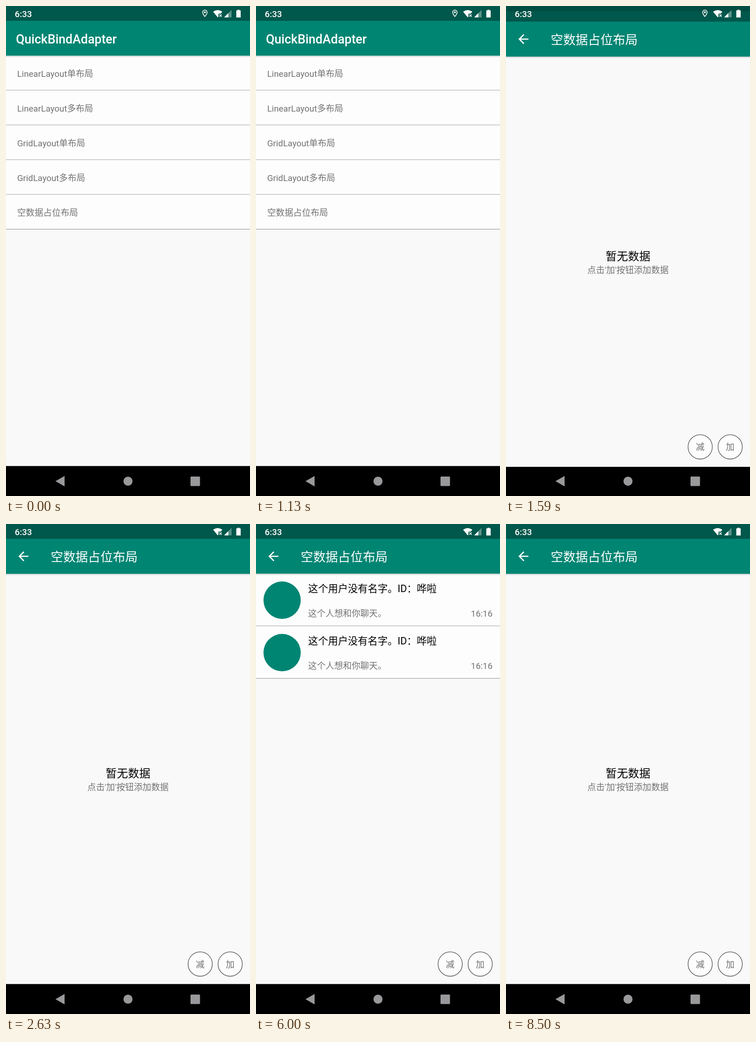
Recreate the animation shown at these times as an HTML page. Size 529x1058 px, loop 8.54 s.

```html
<!DOCTYPE html>
<html lang="zh-CN">
<head>
<meta charset="utf-8">
<title>QuickBindAdapter</title>
<style>
  html, body { margin: 0; width: 100%; height: 100%; overflow: hidden; background: #000; }
  svg { display: block; width: 100%; height: 100%; }
  text { font: 400 18.86px Roboto, "Noto Sans CJK SC", "Noto Sans CJK", sans-serif; fill: #737373; }
  .title { font-size: 26.94px; fill: #fff; }
  .medium { font-weight: 500; }
  .clock { font-weight: 500; fill: #fff; }
  .name { font-size: 21.55px; fill: #000; }
  .big { font-size: 24.25px; fill: #000; }
  .mid { text-anchor: middle; }
  .end { text-anchor: end; }
  .line { fill: #a6a6a8; }
</style>
</head>
<body>
<svg viewBox="0 0 529 1058" preserveAspectRatio="none">
  <defs>
    <linearGradient id="shade" x1="0" y1="0" x2="0" y2="1">
      <stop offset="0" stop-color="#000" stop-opacity=".16"/>
      <stop offset="1" stop-color="#000" stop-opacity="0"/>
    </linearGradient>
    <clipPath id="reveal"><rect id="clip" width="529" height="1058"/></clipPath>
    <g id="frame">
      <rect width="529" height="1058" fill="#000"/>
      <rect y="32" width="529" height="961.3" fill="#f9f9fa"/>
      <rect width="529" height="32.3" fill="#00574b"/>
      <rect y="32" width="529" height="75.6" fill="#008573"/>
    </g>
  </defs>
  <rect width="529" height="1058" fill="#000"/>

  <g id="home">
    <use href="#frame"/>
    <text class="title medium" x="21.5" y="81">QuickBindAdapter</text>
    <g id="menu"></g>
    <rect y="107.6" width="529" height="4" fill="url(#shade)"/>
  </g>

  <g id="detail"><g clip-path="url(#reveal)">
    <use href="#frame"/>
    <path fill="#fff" transform="translate(21.6 53.6) scale(1.347)"
      d="M20 11H7.83l5.59-5.59L12 4l-8 8 8 8 1.41-1.41L7.83 13H20z"/>
    <text class="title" x="97" y="81">空数据占位布局</text>
    <g id="empty">
      <text class="big mid" x="264.5" y="547">暂无数据</text>
      <text class="mid" x="264.5" y="575">点击'加'按钮添加数据</text>
    </g>
    <g id="chats"></g>
    <rect y="107.6" width="529" height="4" fill="url(#shade)"/>
    <g id="buttons"></g>
  </g></g>

  <g id="status" fill="#fff">
    <text class="clock" x="19" y="23.6">6:33</text>
    <g id="pin" transform="translate(421.6 6.4) scale(.8)">
      <path d="M12 2C8.13 2 5 5.13 5 9c0 5.25 7 13 7 13s7-7.75 7-13c0-3.87-3.13-7-7-7zM7 9c0-2.76 2.24-5 5-5s5 2.24 5 5c0 2.88-2.88 7.19-5 9.88C9.92 16.21 7 11.85 7 9z"/>
      <circle cx="12" cy="9" r="2.5"/>
    </g>
    <path d="M449 12.3Q459 5.2 469 12.3L465.6 16.6H460.6V22.8L459 24.4Z"/>
    <path d="M462.6 18.2l5 5m0-5l-5 5" stroke="#fff" stroke-width="1.6"/>
    <path d="M489 8.6V24.4H473Z" opacity=".35"/>
    <path d="M482 15.5V24.4H473Z"/>
    <path d="M499.3 9.6H502V8H506.2V9.6H508.8V24.8H499.3Z"/>
  </g>
  <g id="nav" fill="#dadade" fill-opacity=".7">
    <path d="M107.3 1026L127 1014.8V1037.2Z"/>
    <circle cx="264.5" cy="1026" r="9.8"/>
    <rect x="400" y="1016" width="20.6" height="20.4" rx="1.6"/>
  </g>
</svg>
<script>
const LOOP = 8540, HEIGHT = 1058;
const OPEN = 1271, OPEN_MS = 425, DIM_MS = 117;
const PIN_OFF = 2100, FADE = 120;
const rows = [
  { on: 3200, off: 7700 },
  { on: 3770, off: 7000 }
];

const $ = id => document.getElementById(id);
const clamp = v => Math.min(1, Math.max(0, v));
const ramp = (t, start, ms) => clamp((t - start) / ms);

// Height of a cubic curve at x, where p = [x0, y0, ..., x3, y3].
function curve(p, x) {
  const at = (s, k) => {
    const r = 1 - s;
    return r * r * r * p[k] + 3 * r * r * s * p[k + 2] + 3 * r * s * s * p[k + 4] + s * s * s * p[k + 6];
  };
  let lo = 0, hi = 1;
  for (let i = 0; i < 30; i++) {
    const m = (lo + hi) / 2;
    if (at(m, 0) < x) lo = m; else hi = m;
  }
  return at(hi, 1);
}
const slide = x => x >= 1 ? 1 : curve([0, 0, .4, 0, .2, 1, 1, 1], x);
const unveil = x => x >= 1 ? 1 : x < 1 / 6
  ? curve([0, 0, .05, 0, .13333, .06, 1 / 6, .4], x)
  : curve([1 / 6, .4, .20833, .82, .25, 1, 1, 1], x);

$('menu').innerHTML = ['LinearLayout单布局', 'LinearLayout多布局', 'GridLayout单布局', 'GridLayout多布局', '空数据占位布局']
  .map((label, i) => `<g transform="translate(0 ${107.5 + 75 * i})">
    <rect width="529" height="75" fill="#fdfdfd"/>
    <text x="24.2" y="45.5">${label}</text>
    <rect class="line" y="73.8" width="529" height="1.35"/></g>`).join('');

$('chats').innerHTML = rows.map((row, i) => `<g transform="translate(0 ${107.5 + 113.2 * i})">
    <rect width="529" height="113.2" fill="#fdfdfd"/>
    <circle cx="56.6" cy="57" r="40.4" fill="#008573"/>
    <text class="name" x="113.1" y="39.5">这个用户没有名字。ID：哗啦</text>
    <text x="113.1" y="92.3">这个人想和你聊天。</text>
    <text class="end" x="512.8" y="92.3">16:16</text>
    <rect class="line" y="112" width="529" height="1.35"/></g>`).join('');

$('buttons').innerHTML = [[421, '减'], [486, '加']].map(([x, label]) =>
  `<circle cx="${x}" cy="950.2" r="26.3" fill="#fdfdfd" stroke="#555" stroke-width="1.35"/>
   <text class="mid" x="${x}" y="957.6">${label}</text>`).join('');

const cells = [...$('chats').children];
const show = (el, alpha) => {
  el.setAttribute('opacity', alpha);
  el.style.display = alpha > 0 ? '' : 'none';
};
const move = (el, y) => el.setAttribute('transform', `translate(0 ${y})`);

function render(t) {
  const k = ramp(t, OPEN, OPEN_MS), s = slide(k);
  move($('home'), -.02 * HEIGHT * s);
  show($('home'), k < 1 ? 1 - .1 * ramp(t, OPEN, DIM_MS) : 0);
  move($('detail'), .041 * HEIGHT * (1 - s));
  show($('detail'), k > 0 ? 1 : 0);
  $('clip').setAttribute('y', .959 * HEIGHT * (1 - unveil(k)));
  rows.forEach((row, i) => show(cells[i], ramp(t, row.on, FADE) - ramp(t, row.off, FADE)));
  show($('empty'), 1 - ramp(t, rows[0].on, FADE) + ramp(t, rows[0].off, FADE));
  show($('pin'), t < PIN_OFF ? 1 : 0);
}

const start = performance.now();
function tick() {
  render((performance.now() - start) % LOOP);
  requestAnimationFrame(tick);
}
tick();
</script>
</body>
</html>
```
